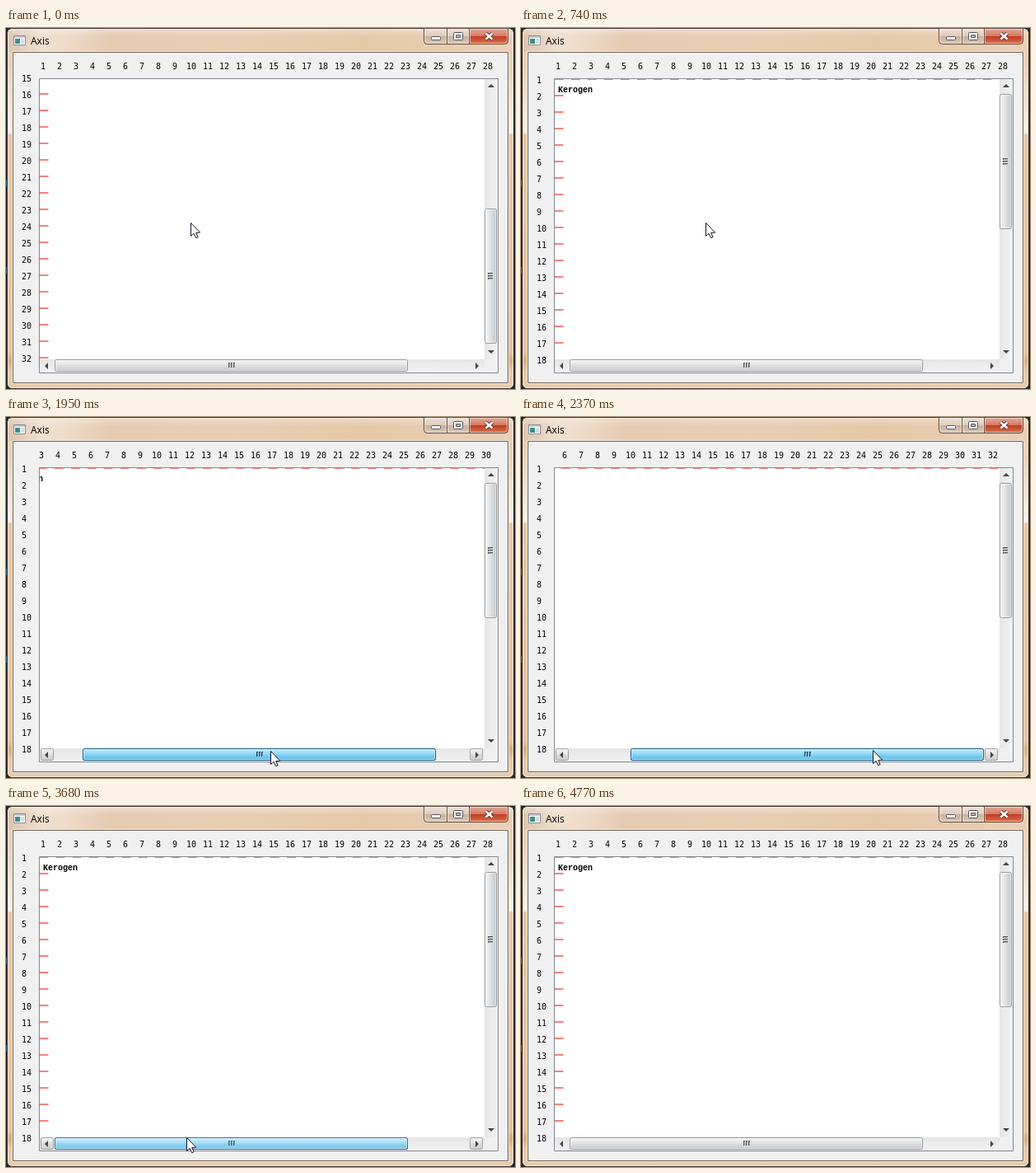
These frames come from a looping animation (618 by 438 pixels, 5060 ms). An HTML page with a canvas:

```html
<!DOCTYPE html>
<html lang="en">
<head>
<meta charset="utf-8">
<title>Axis</title>
<style>
html, body { margin: 0; width: 100%; height: 100%; overflow: hidden; background: #20242b; }
canvas { display: block; }
</style>
</head>
<body>
<canvas id="stage" width="618" height="438"></canvas>
<script>
const ctx = document.getElementById('stage').getContext('2d');
const LOOP = 5060, STEP = 130, PITCH = 20, MAX_SCROLL = 282;
const DIGITS = '10px "DejaVu Sans Mono", monospace';

// Each move walks to its goal in even steps; level: 0 idle, 1 hover, 2 pressed
const moves = [
  { start: 370, end: 370, scroll: 192 },
  { start: 620, end: 740, scroll: 0 },
  { start: 1170, end: 1570, x: 265, y: 402 },
  { start: 1710, end: 1950, x: 321, y: 405, level: 2 },
  { start: 2100, end: 2370, x: 427, y: 404 },
  { start: 2900, end: 3140, x: 309, y: 403 },
  { start: 3290, end: 3530, x: 235, y: 402 },
  { start: 3680, end: 3920, x: 188, y: 402, level: 1 },
  { start: 4350, end: 4350, x: -50 },
  { start: 4500, end: 4770, level: 0 }
];

function poseAt(t) {
  const pose = { x: 224, y: 236, level: 0, scroll: MAX_SCROLL };
  for (const { start, end, ...goal } of moves) {
    if (t < start) break;
    const gaps = Math.round((end - start) / STEP);
    const passed = Math.floor((t - start) * gaps / (end - start || 1));
    const done = Math.min(1, (passed + 1) / (gaps + 1));
    for (const key in goal) pose[key] += (goal[key] - pose[key]) * done;
  }
  return pose;
}

const clamp = (v, lo, hi) => Math.max(lo, Math.min(hi, v));

const skins = [
  { edge: '#979797', stops: ['#f6f6f6', '#e8e9ea', '#d4d7d9', '#c2c6ca'], grip: '#555' },
  { edge: '#3c7fb1', stops: ['#e6f6fd', '#d0ecfa', '#a9dcf5', '#9bd3f0'], grip: '#2b5878' },
  { edge: '#18598a', stops: ['#c6ebfa', '#a4dff6', '#70c8ec', '#62bbe5'], grip: '#123f60' }
];

function rect(x, y, w, h, fill) {
  ctx.fillStyle = fill;
  ctx.fillRect(x, y, w, h);
}

function poly(points, fill, stroke) {
  ctx.beginPath();
  points.forEach(p => ctx.lineTo(...p));
  ctx.closePath();
  ctx.fillStyle = fill;
  ctx.fill();
  if (stroke) { ctx.strokeStyle = stroke; ctx.stroke(); }
}

function box(x, y, w, h, r, fill, edge) {
  ctx.beginPath();
  ctx.roundRect(x + .5, y + .5, w - 1, h - 1, r);
  ctx.fillStyle = fill;
  ctx.fill();
  ctx.strokeStyle = edge;
  ctx.stroke();
}

function text(s, x, y, font) {
  ctx.font = font;
  ctx.fillStyle = '#000';
  ctx.fillText(s, x, y);
}

// stops are colours spread evenly, or [offset, colour] pairs
function fade(x0, y0, x1, y1, stops) {
  const g = ctx.createLinearGradient(x0, y0, x1, y1);
  stops.forEach((s, i) => Array.isArray(s) ? g.addColorStop(...s) : g.addColorStop(i / (stops.length - 1), s));
  return g;
}

// two hard halves, as on glossy buttons
const gloss = (h, [a, b, c, d]) => fade(0, 0, 0, h, [[0, a], [.48, b], [.5, c], [1, d]]);

function windowFrame() {
  rect(0, 0, 618, 438, '#20242b');
  for (let y = 188; y < 400; y += 106) rect(0, y - 4, 1, 8, '#27688f');
  const side = fade(0, 0, 0, 438, [[0, '#ecd2b9'], [.1, '#e9cfb4'], [.29, '#fcf3e8'],
    [.295, '#e6c6a4'], [.9, '#e4c39d'], [.92, '#d4ac78'], [.95, '#e6c8a6'], [1, '#e6cbae']]);
  box(1, 0, 616, 438, 6, side, '#3a302a');
  rect(3, 2, 612, 27, fade(2, 0, 616, 0, [[0, '#dcc4ad'], [.07, '#f0e0d0'], [.11, '#efdccb'],
    [.2, '#e6cbb1'], [.45, '#e9ceb3'], [.7, '#e6c8a9'], [1, '#ead0b7']]));
  rect(3, 2, 612, 9, fade(0, 2, 0, 11, ['rgba(255,255,255,.3)', 'rgba(255,255,255,0)']));
  box(2, 1, 614, 436, 5, 'transparent', 'rgba(255,248,240,.65)');

  box(9, 9, 15, 12, 0, '#fdfdfd', '#858c91');
  rect(10, 10, 13, 2, '#c3ccd3');
  rect(11, 13, 6, 6, '#3a8f86');
  rect(18, 13, 4, 6, '#d6dce0');
  text('Axis', 30, 20, '12px "Open Sans", sans-serif');

  captionButtons();
  box(7, 28, 604, 404, 1, '#f6e8da', '#f6e8da');
  box(8, 29, 602, 402, 0, '#f0f0f0', '#6e6259');
}

function captionButtons() {
  const plain = gloss(20, ['#f0e3d8', '#dfcdbd', '#c7b09c', '#dccab8']);
  const red = gloss(20, ['#e6ad9d', '#d57a65', '#bd3a22', '#dd7850']);
  const button = (x, w, corners, fill) => {
    box(x, 0, w, 20, corners, fill, '#5b4a40');
    box(x + 1, 1, w - 2, 18, corners, 'transparent', 'rgba(255,255,255,.55)');
  };
  button(507, 29, [0, 0, 0, 4], plain);
  button(535, 28, 0, plain);
  button(562, 48, [0, 0, 4, 0], red);
  const glyph = '#4f535c';
  box(516, 10, 12, 5, 1, '#fff', glyph);
  box(543, 5, 12, 10, 1, '#fff', glyph);
  box(546, 8, 6, 4, 0, '#cbb7a5', glyph);
  for (const [color, width] of [['#5a3530', 4.6], ['#fff', 2.6]]) {
    ctx.lineWidth = width;
    ctx.strokeStyle = color;
    ctx.beginPath();
    for (const d of [-4, 4]) {
      ctx.moveTo(586.5 - d, 6.5);
      ctx.lineTo(586.5 + d, 13.5);
    }
    ctx.stroke();
  }
  ctx.lineWidth = 1;
}

// drawn as a horizontal bar; the vertical one swaps the axes
function scrollBar(vertical, cross, from, to, start, len, level) {
  ctx.save();
  if (vertical) ctx.transform(0, 1, 1, 0, 0, 0);
  const across = stops => fade(0, cross, 0, cross + 15, stops);
  rect(from, cross, to - from, 16, across(['#e5e5e5', '#ececec', '#f1f1f1']));
  const hover = clamp(level, 0, 1);
  ctx.globalAlpha = hover;
  for (const x of [from + 1, to - 18])
    box(x, cross, 16, 15, 2, across(['#f4f4f4', '#e9e9e9', '#d6d6d6', '#cecece']), '#a0a0a0');
  ctx.globalAlpha = 1;
  const mid = cross + 8;
  for (const [x, d] of [[from + 6, 1], [to - 7, -1]])
    poly([[x, mid], [x + 4 * d, mid - 4], [x + 4 * d, mid + 4]], '#444');
  [1, hover, clamp(level - 1, 0, 1)].forEach((alpha, i) => {
    const { edge, stops, grip } = skins[i];
    ctx.globalAlpha = alpha;
    box(start, cross, len, 15, 2, across(stops), edge);
    box(start + 1, cross + 1, len - 2, 13, 1, 'transparent', 'rgba(255,255,255,.55)');
    const center = Math.round(start + len / 2);
    for (let x = center - 4; x < center + 4; x += 3) {
      rect(x, cross + 4, 2, 6, grip);
      rect(x + 1, cross + 5, 1, 6, 'rgba(255,255,255,.5)');
    }
  });
  ctx.restore();
}

function view(sx, sy) {
  for (let n = 1; n <= 40; n++) {
    const s = String(n);
    const x = 45 + PITCH * (n - 1) - sx, y = 63 + PITCH * (n - 1) - sy;
    if (x >= 41 && x <= 588) text(s, x - 3 * s.length, 50, DIGITS);
    if (y >= 59 && y <= 413) text(s, 19, y + 4, DIGITS);
  }
  box(40, 61, 558, 358, 0, '#fff', '#828790');
  ctx.save();
  ctx.beginPath();
  ctx.rect(41, 62, 540, 339);
  ctx.clip();
  for (let d = 0; d < 40 * PITCH; d += PITCH) {
    rect(41 + d - sx, 61 - sy, 10.5, 2, '#f98080');
    rect(41 - sx, 81 + d - sy, 10.5, 2, '#f98080');
  }
  text('Kerogen', 45 - sx, 78 - sy, 'bold 10px "Liberation Mono", monospace');
  ctx.restore();
  rect(581, 402, 16, 16, '#f0f0f0');
}

function pointer(x, y) {
  ctx.save();
  ctx.translate(x + .5, y + .5);
  poly([[0, 0], [0, 16], [3.6, 12.8], [6.2, 18.2], [8.6, 17.2], [6.2, 12], [11.2, 11.6]], '#fff', '#14142a');
  ctx.restore();
}

function draw(now) {
  const t = now % LOOP;
  const { x, y, level, scroll } = poseAt(t);
  const grab = t < 2370 ? 287 : 261;
  const shift = Math.round(clamp(x - grab, 0, 74));
  windowFrame();
  view(Math.floor(shift * 1.25), scroll);
  scrollBar(true, 581, 62, 402, 80 + Math.round(139 * scroll / MAX_SCROLL), 164, 0);
  scrollBar(false, 402, 41, 581, 59 + shift, 429, level);
  pointer(Math.round(x), Math.round(y));
  requestAnimationFrame(() => draw(performance.now() - begin));
}

const begin = performance.now();
draw(0);
</script>
</body>
</html>
```
